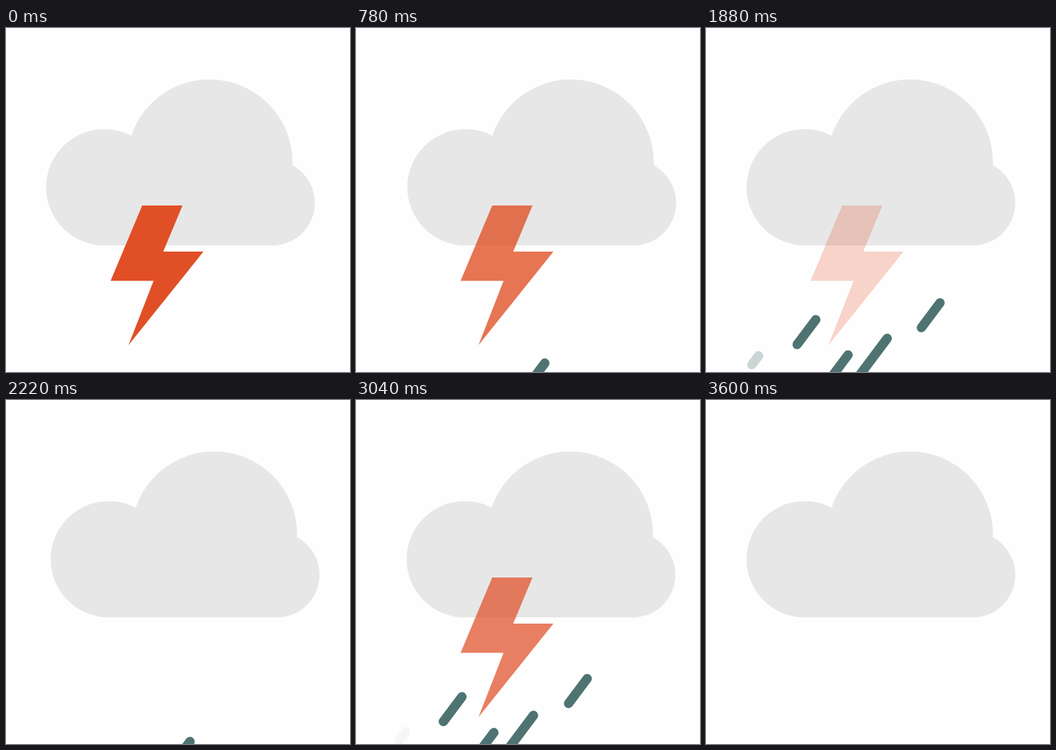
Write an HTML page with a canvas that moves like this. It is 500 by 500 pixels and loops after 3.62 s.

```html
<!DOCTYPE html>
<html lang="en">
<head>
<meta charset="utf-8">
<title>Thunderstorm</title>
<style>
  html, body { margin: 0; width: 100%; height: 100%; overflow: hidden; background: #fefefe; }
  canvas { display: block; width: 500px; height: 500px; }
</style>
</head>
<body>
<canvas id="stage" width="500" height="500"></canvas>
<script>
const ctx = document.getElementById('stage').getContext('2d');
const LOOP = 3620;
const FLASH = LOOP / 3;
const SWAY = LOOP / 4;
const FADE_IN = 80;

// Moments each shower reaches its middle; the last one wraps into the next loop.
const SHOWERS = [470, 1880, 3020, 470 + LOOP];

// track: offset across the slope, path: [time, distance down the slope]
const DROPS = [
  { track: 347, length: 16, start: -430, end: 25, path: [[-340, 218], [0, 335]] },
  { track: 382, length: 45, start: -225, end: 400, path: [[-225, 139], [0, 243]] },
  { track: 450.3, length: 139, start: -404, end: 400, path: [[-340, 98.6], [-240, 133.6], [0, 255.8]] },
  { track: 481.4, length: 100, start: -280, end: 400, path: [[-240, 93], [0, 202.4]] },
  { track: 511.8, length: 45, start: -170, end: 480, path: [[0, 115.2], [240, 197.4], [310, 224.6]] }
];

const BOLT = [[198, 258], [256.5, 258], [228.5, 325], [287, 325], [178, 461], [214.5, 367.5], [152, 367.5]];
const BOLT_ALPHA = [[0, 1], [600, 1], [698, 0], [804, 1], [896, 0], [FLASH, 0]];

const clamp = v => Math.max(0, Math.min(1, v));

// Piecewise linear; the outer segments extend past their ends.
function along(points, t) {
  let i = 1;
  while (i < points.length - 1 && t > points[i][0]) i++;
  const [t0, v0] = points[i - 1], [t1, v1] = points[i];
  return v0 + (v1 - v0) * (t - t0) / (t1 - t0);
}

function cloudShift(t) {
  const p = Math.pow((t % SWAY) / SWAY, 1.4);
  return 20 * (Math.floor(t / SWAY) % 2 ? 1 - p : p);
}

function drawCloud(shift) {
  ctx.save();
  ctx.translate(shift, 0);
  ctx.fillStyle = '#e7e7e7';
  ctx.beginPath();
  for (const [x, y, r] of [[142.8, 231.5, 84.5], [296, 195.3, 120.5], [387.2, 254.2, 61.8]]) {
    ctx.moveTo(x + r, y);
    ctx.arc(x, y, r, 0, Math.PI * 2);
  }
  ctx.rect(142.8, 231.5, 244.4, 84.5);
  ctx.fill();
  ctx.restore();
}

function drawDrop(drop, t) {
  if (t <= drop.start || t >= drop.end) return;
  const top = along(drop.path, t);
  const point = d => [0.8 * drop.track - 0.6 * d, 0.6 * drop.track + 0.8 * d];
  ctx.globalAlpha = clamp((t - drop.start) / FADE_IN) * clamp((drop.end - t) / FADE_IN);
  ctx.beginPath();
  ctx.moveTo(...point(top));
  ctx.lineTo(...point(top + drop.length));
  ctx.stroke();
}

function drawRain(t) {
  ctx.strokeStyle = '#4f7373';
  ctx.lineWidth = 13.6;
  ctx.lineCap = 'round';
  for (const shower of SHOWERS) {
    for (const drop of DROPS) drawDrop(drop, t - shower);
  }
  ctx.globalAlpha = 1;
}

function drawBolt(alpha) {
  ctx.globalAlpha = clamp(alpha);
  ctx.fillStyle = '#e04f26';
  ctx.beginPath();
  for (const [x, y] of BOLT) ctx.lineTo(x, y);
  ctx.fill();
  ctx.globalAlpha = 1;
}

function draw(t) {
  ctx.fillStyle = '#fefefe';
  ctx.fillRect(0, 0, 500, 500);
  drawCloud(cloudShift(t));
  drawRain(t);
  drawBolt(along(BOLT_ALPHA, t % FLASH));
}

const began = performance.now();
function tick() {
  draw((performance.now() - began) % LOOP);
  requestAnimationFrame(tick);
}
tick();
</script>
</body>
</html>
```
